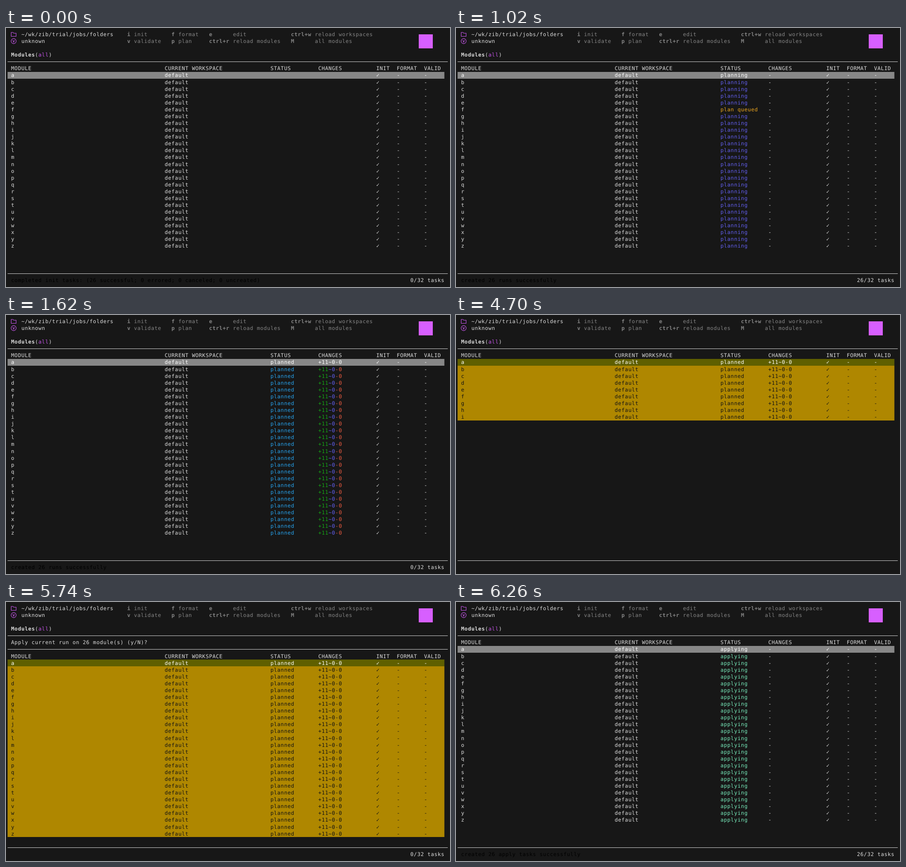
Animation of 980 by 572 pixels, one loop 8 s. Source, as an HTML page with a canvas:

```html
<!DOCTYPE html>
<html lang="en">
<head>
<meta charset="utf-8">
<title>Module runs</title>
<style>
  html, body { margin: 0; width: 100%; height: 100%; overflow: hidden; background: #171717; }
  canvas { display: block; width: 980px; height: 572px; }
</style>
</head>
<body>
<canvas id="term"></canvas>
<script>
const LOOP = 8000, W = 980, H = 572;
const CELL = 7.532, LINE = 15.08, LEFT = 3.5, TOP = 6.5, BASE = 11.5;
const FONT = '11.5px "DejaVu Sans Mono", monospace';
const C = {
  bg: '#171717', text: '#dddddd', dim: '#858585', white: '#ffffff', black: '#000000',
  rule: '#d0d0d0', purple: '#c355e6', logo: '#d75fff',
  cursorRow: '#878787', marked: '#af8700', markedCursor: '#5f5f00', ink: '#141414',
  planning: '#625fee', queued: '#eba51f', planned: '#27a3ee', applying: '#78ecbc',
  add: '#16a616', change: '#625fee', remove: '#ea5a40'
};
const COLS = { module: 1, space: 46, status: 77, changes: 91, init: 108, format: 114, valid: 122 };
const HEAD = [['module', 'MODULE'], ['space', 'CURRENT WORKSPACE'], ['status', 'STATUS'],
  ['changes', 'CHANGES'], ['init', 'INIT'], ['format', 'FORMAT'], ['valid', 'VALID']];
const KEYS = [
  [0, 35, 'i', 37, 'init'], [1, 35, 'v', 37, 'validate'],
  [0, 48, 'f', 50, 'format'], [1, 48, 'p', 50, 'plan'],
  [0, 59, 'e', 66, 'edit'], [1, 59, 'ctrl+r', 66, 'reload modules'],
  [0, 83, 'ctrl+w', 90, 'reload workspaces'], [1, 83, 'M', 90, 'all modules']
];
const CREATED = 'created 26 runs successfully';

// Scattered finishing order for the parallel tasks
const rank = i => (i * 7 + 3) % 26;
const planning = left => i => rank(i) < left ? 'planning' : 'planned';
const planned = () => 'planned';

const STEPS = [
  [0, { tasks: 0, note: 'completed init tasks: (26 successful; 0 errored; 0 canceled; 0 uncreated)' }],
  [500, { tasks: 0, marked: true }],
  [1020, { tasks: 26, note: CREATED, status: i => i === 5 ? 'plan queued' : 'planning' }],
  [1060, { tasks: 26, note: CREATED, status: planning(26) }],
  [1460, { tasks: 19, note: CREATED, status: planning(19) }],
  [1500, { tasks: 12, note: CREATED, status: planning(12) }],
  [1580, { tasks: 4, note: CREATED, status: planning(4) }],
  [1620, { tasks: 0, note: CREATED, status: planned }],
  [4700, { rows: 9, marked: true, status: planned }],
  [4740, { tasks: 0, marked: true, status: planned }],
  [5180, { tasks: 0, marked: true, status: planned, prompt: true, cursor: true }],
  [5740, { tasks: 0, marked: true, status: planned, prompt: true }],
  [6220, { tasks: 26, note: 'created 26 apply tasks successfully',
    status: i => rank(i) < 4 ? 'apply queued' : 'applying' }],
  [6260, { tasks: 26, note: 'created 26 apply tasks successfully', status: () => 'applying' }]
];

const canvas = document.getElementById('term');
const ctx = canvas.getContext('2d');
const dpr = window.devicePixelRatio || 1;
canvas.width = W * dpr;
canvas.height = H * dpr;
ctx.scale(dpr, dpr);
ctx.textRendering = 'geometricPrecision';

const xAt = col => LEFT + col * CELL;
const yAt = row => TOP + row * LINE;

function put(col, row, text, color = C.text, bold = false) {
  ctx.font = (bold ? 'bold ' : '') + FONT;
  ctx.fillStyle = color;
  [...text].forEach((ch, i) => {
    if (ch !== ' ') ctx.fillText(ch, xAt(col + i) + 0.3, yAt(row) + BASE);
  });
}

function fill(col, row, cols, color) {
  const y = Math.round(yAt(row));
  ctx.fillStyle = color;
  ctx.fillRect(xAt(col), y, cols * CELL, Math.round(yAt(row + 1)) - y);
}

function rule(row) {
  ctx.fillStyle = C.rule;
  ctx.fillRect(xAt(0), Math.round(yAt(row) + 7.3), 129 * CELL, 1);
}

function icons() {
  ctx.strokeStyle = C.purple;
  ctx.lineWidth = 1.1;
  ctx.stroke(new Path2D('M11.5 18.5V9.8h4l1.5 1.7h5.3v7z'));
  ctx.stroke(new Path2D('M22.5 29a5.6 5.6 0 1 1-11.2 0a5.6 5.6 0 1 1 11.2 0M14.9 26.7l2 4.6l2-4.6'));
}

function header() {
  icons();
  put(4, 0, '~/wk/zib/trial/jobs/folders');
  put(4, 1, 'unknown');
  for (const [row, keyCol, key, col, label] of KEYS) {
    put(keyCol, row, key, C.dim, true);
    put(col, row, label, C.dim);
  }
  put(1, 3, 'Modules', C.text, true);
  put(8, 3, '(');
  put(9, 3, 'all', C.purple);
  put(12, 3, ')');
  ctx.fillStyle = C.logo;
  ctx.fillRect(911, 14, 31, 31);
  rule(4);
}

function statusColor(name) {
  return name.endsWith('queued') ? C.queued : C[name];
}

function moduleRow(i, row, s) {
  const current = i === 0;
  const flat = current ? C.white : s.marked ? C.ink : null;
  const color = flat || C.text;
  if (s.marked) fill(0, row, 128, current ? C.markedCursor : C.marked);
  else if (current) fill(0, row, 128, C.cursorRow);

  put(COLS.module, row, String.fromCharCode(97 + i), color);
  put(COLS.space, row, 'default', color);
  put(COLS.init, row, '✓', color);
  put(COLS.format, row, '-', color);
  put(COLS.valid, row, '-', color);
  if (!s.status) return;

  const name = s.status(i);
  put(COLS.status, row, name, flat || statusColor(name));
  if (name === 'planned') {
    put(COLS.changes, row, '+11', flat || C.add);
    put(COLS.changes + 3, row, '~0', flat || C.change);
    put(COLS.changes + 5, row, '-0', flat || C.remove);
  } else {
    put(COLS.changes, row, '-', color);
  }
}

function draw(s) {
  ctx.fillStyle = C.bg;
  ctx.fillRect(0, 0, W, H);
  header();

  let row = 5;
  if (s.prompt) {
    put(1, 5, 'Apply current run on 26 module(s) (y/N)?');
    if (s.cursor) fill(42, 5, 1, C.text);
    rule(6);
    row = 7;
  }
  for (const [key, label] of HEAD) put(COLS[key], row, label);
  const rows = s.rows || 26;
  for (let i = 0; i < rows; i++) moduleRow(i, row + 1 + i, s);

  rule(35);
  if (s.note) put(1, 36, s.note, C.black);
  if (s.tasks !== undefined) {
    const label = s.tasks + '/32 tasks';
    put(128 - label.length, 36, label);
  }
}

let shown = null;
function tick() {
  const t = performance.now() % LOOP;
  const step = STEPS.filter(([at]) => at <= t).pop();
  if (step !== shown) draw(step[1]);
  shown = step;
  requestAnimationFrame(tick);
}
tick();
</script>
</body>
</html>
```
